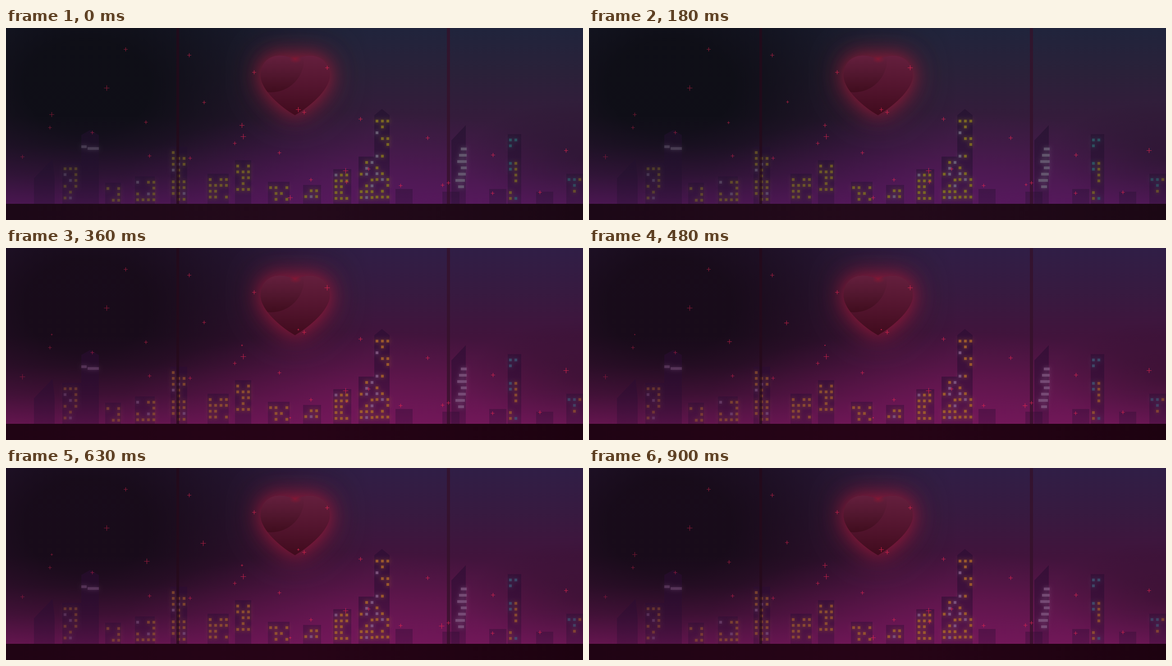
An HTML page with a canvas that plays this animation: 1280 by 427 pixels, repeating every 930 ms.

```html
<!DOCTYPE html>
<html lang="en">
<head>
<meta charset="utf-8">
<title>Neon heart over the city</title>
<style>
html, body { margin: 0; width: 100%; height: 100%; overflow: hidden; background: #14101c; }
canvas { display: block; }
</style>
</head>
<body>
<canvas id="stage" width="1280" height="427"></canvas>
<script>
const W = 1280, H = 427, FLOOR = 391, LOOP = 930, STEP = 30;
const ctx = document.getElementById('stage').getContext('2d');

const moods = {
  dim: {
    sky: ['#20243c', '#2a2139', '#341c3b', '#3a1a3f', '#421a48'],
    dark: '14,14,22', glow: '94,24,100', wall: ['#1c0817', '#240a1b', '#1b0714'],
    tower: '34,16,46', yellow: '#82701f', white: '#6d6478', teal: '#2c6a70'
  },
  lit: {
    sky: ['#301e46', '#371a40', '#41143c', '#4a143f', '#541547'],
    dark: '23,11,25', glow: '126,24,96', wall: ['#200414', '#270417', '#1d0210'],
    tower: '42,12,50', yellow: '#a4602a', white: '#805880', teal: '#3f5f7c'
  }
};

// Each building: left, top, width, and an optional roof peak (position across, height)
const plain = [
  [125, 300, 42], [220, 344, 35], [286, 330, 44], [365, 264, 37], [447, 324, 47], [508, 294, 36],
  [581, 342, 48], [659, 349, 40], [726, 314, 40], [782, 286, 35], [1113, 236, 30], [1243, 324, 37]
];
const peaked = [[62, 334, 46, 0.9, 43], [167, 238, 39, 0.5, 11], [817, 194, 34, 0.5, 14], [988, 250, 32, 1, 34]];

// Stars that share one rhythm: smallest and largest size, time of the largest, points with drift
const starGroups = [
  { min: 6, max: 12, peak: 645, points: [[440, 164, 3], [309, 210, -3], [969, 348, 3]] },
  { min: 8, max: 12, peak: 315, points: [[36, 286], [1242, 272], [712, 88]] },
  { min: 3, max: 11, peak: 0, points: [[101, 192], [523, 216], [648, 181], [630, 377]] },
  { min: 0, max: 9, peak: 70, points: [[755, 342]] },
  { min: 12, max: 12, peak: 0, points: [[223, 133], [526, 241], [753, 317]] },
  { min: 9, max: 9, peak: 0, points: [[265, 47], [406, 60], [550, 98], [661, 187], [786, 202], [935, 244], [1080, 282]] },
  { min: 8, max: 8, peak: 0, points: scatter(12, 5) }
];

const heart = new Path2D('M641 71C655 62 676 59 690 64C709 70 720 87 718 110C714 140 675 174 641 194' +
  'C607 174 569 140 565 110C563 87 574 70 592 64C607 59 627 62 641 71Z');

function seeded(seed) {
  return () => {
    seed = (seed * 16807) % 2147483647;
    return seed / 2147483647;
  };
}

// Spread across the stage, sinking to the right
function scatter(count, seed) {
  const random = seeded(seed * 7919);
  return Array.from({ length: count }, (_, i) => {
    const x = 85 + i * 98 + random() * 40;
    return [Math.round(x), Math.round(190 + x / 10 + random() * 90)];
  });
}

function ramp(c, x0, y0, x1, y1, colors) {
  const g = c.createLinearGradient(x0, y0, x1, y1);
  colors.forEach((color, i) => g.addColorStop(i / (colors.length - 1), color));
  return g;
}

const fade = (rgb, alphas) => alphas.map(a => `rgba(${rgb},${a})`);

function halo(c, x, y, r, squash, rgb, alpha, core = 0) {
  c.save();
  c.translate(x, y);
  c.scale(1, squash);
  const g = c.createRadialGradient(0, 0, r * core, 0, 0, r);
  fade(rgb, [alpha, alpha * 0.5, 0]).forEach((color, i) => g.addColorStop(i / 2, color));
  c.fillStyle = g;
  c.fillRect(-r, -r, 2 * r, 2 * r);
  c.restore();
}

function drawSky(c, m) {
  c.fillStyle = ramp(c, 0, 0, 0, FLOOR, m.sky);
  c.fillRect(0, 0, W, H);
  halo(c, 180, 130, 640, 0.75, m.dark, 0.97, 0.22);
  halo(c, 780, 340, 520, 0.3, m.glow, 0.4);
  c.fillStyle = ramp(c, 0, 195, 0, FLOOR, fade(m.glow, [0, 0.08, 0.27, 0.62]));
  c.fillRect(0, 195, W, FLOOR - 195);
  halo(c, 1280, 290, 260, 0.5, m.dark, 0.3);
}

function drawBuilding(c, x, top, w, across = 0, rise = 0) {
  c.beginPath();
  c.moveTo(x, FLOOR);
  c.lineTo(x, top);
  c.lineTo(x + w * across, top - rise);
  c.lineTo(x + w, across === 1 ? top - rise : top);
  c.lineTo(x + w, FLOOR);
  c.fill();
}

// Windows sit on a 12 by 13 grid; the brightest part of town is near x = 800
function drawWindows(c, m, x, top, w, random) {
  for (let y = top + 13; y < FLOOR - 6; y += 13)
    for (let wx = x + 3; wx < x + w - 4; wx += 12) {
      const lit = random() < 0.58, tint = random();
      if (!lit) continue;
      const kind = x > 1100 && tint < 0.6 ? 'teal' : tint < 0.12 ? 'white' : 'yellow';
      drawPane(c, m[kind], wx, y - 3, 6);
    }
}

function drawPane(c, color, x, y, w) {
  c.globalAlpha = 0.88 - Math.abs(x - 800) / 1300;
  c.fillStyle = c.shadowColor = color;
  c.fillRect(x, y, w, 6);
}

function drawCity(c, m) {
  c.fillStyle = ramp(c, 0, 180, 0, FLOOR, fade(m.tower, [0.62, 0.55, 0.3]));
  for (const b of [...plain, ...peaked]) drawBuilding(c, ...b);
  for (let i = 0; i < 4; i++) drawBuilding(c, 864 + i * 104, 358 + i % 2 * 6, 38);

  const random = seeded(2024);
  const [, domed, tall, slanted] = peaked;
  c.save();
  c.shadowBlur = 9;
  for (const [x, top, w] of [...plain, tall]) drawWindows(c, m, x, top, w, random);
  drawPane(c, m.white, domed[0], 261, 12);
  drawPane(c, m.white, domed[0] + 14, 265, 25);
  for (let i = 0; i < 7; i++) {
    const w = 13 + 4 * (i % 3);
    drawPane(c, m.white, slanted[0] + 34 - w - 2 * Math.max(0, i - 3), 266 + i * 14, w);
  }
  c.restore();
}

function drawHeart(c) {
  c.save();
  c.fillStyle = '#5a1430';
  for (const [blur, alpha] of [[70, 0.6], [40, 0.6]]) {
    c.shadowBlur = blur;
    c.shadowColor = `rgba(175,26,58,${alpha})`;
    c.fill(heart);
  }
  c.clip(heart);
  c.shadowBlur = 0;
  c.fillStyle = ramp(c, 0, 62, 0, 194, ['#641f3d', '#54152f', '#400b1d']);
  c.fillRect(560, 55, 165, 145);
  c.fillStyle = ramp(c, 0, 62, 0, 143, ['#641f3d', '#52172f', '#400d1e']);
  c.beginPath();
  c.arc(588, 70, 73, 0, 2 * Math.PI);
  c.fill();
  c.restore();
  halo(c, 642, 70, 14, 0.6, '150,20,48', 0.5);
}

function drawRoom(c, m) {
  c.fillStyle = 'rgba(38,9,26,.72)';
  c.fillRect(378, 0, 6, FLOOR);
  c.fillStyle = 'rgba(52,16,40,.75)';
  c.fillRect(978, 0, 7, FLOOR);
  c.fillStyle = ramp(c, 0, 0, W, 0, m.wall);
  c.fillRect(0, FLOOR, W, H - FLOOR);
}

function drawStar(c, x, y, size) {
  const r = size / 2, t = 0.6;
  c.fillStyle = `rgba(232,38,80,${Math.min(0.78, 0.38 + x / 1600)})`;
  c.beginPath();
  c.rect(x + 0.5 - r, y + 0.5 - t, size, 2 * t);
  c.rect(x + 0.5 - t, y + 0.5 - r, 2 * t, size);
  c.fill();
}

function paintScene(m) {
  const layer = document.createElement('canvas');
  layer.width = W;
  layer.height = H;
  const c = layer.getContext('2d');
  for (const draw of [drawSky, drawCity, drawHeart, drawRoom]) draw(c, m);
  return layer;
}

const dimScene = paintScene(moods.dim), litScene = paintScene(moods.lit);
const isDim = t => t < 210 || (t >= 510 && t < 540);

function render(now) {
  const t = Math.floor((now % LOOP) / STEP) * STEP;
  ctx.drawImage(isDim(t) ? dimScene : litScene, 0, 0);
  for (const { min, max, peak, points } of starGroups) {
    const k = (1 + Math.cos(2 * Math.PI * (t - peak) / LOOP)) / 2;
    const size = min + (max - min) * k;
    if (size < 1.3) continue;
    for (const [x, y, drift = 0] of points) drawStar(ctx, x - drift * k, y + drift * k, size);
  }
}

const start = performance.now();
function tick() {
  render(performance.now() - start);
  requestAnimationFrame(tick);
}
tick();
</script>
</body>
</html>
```
